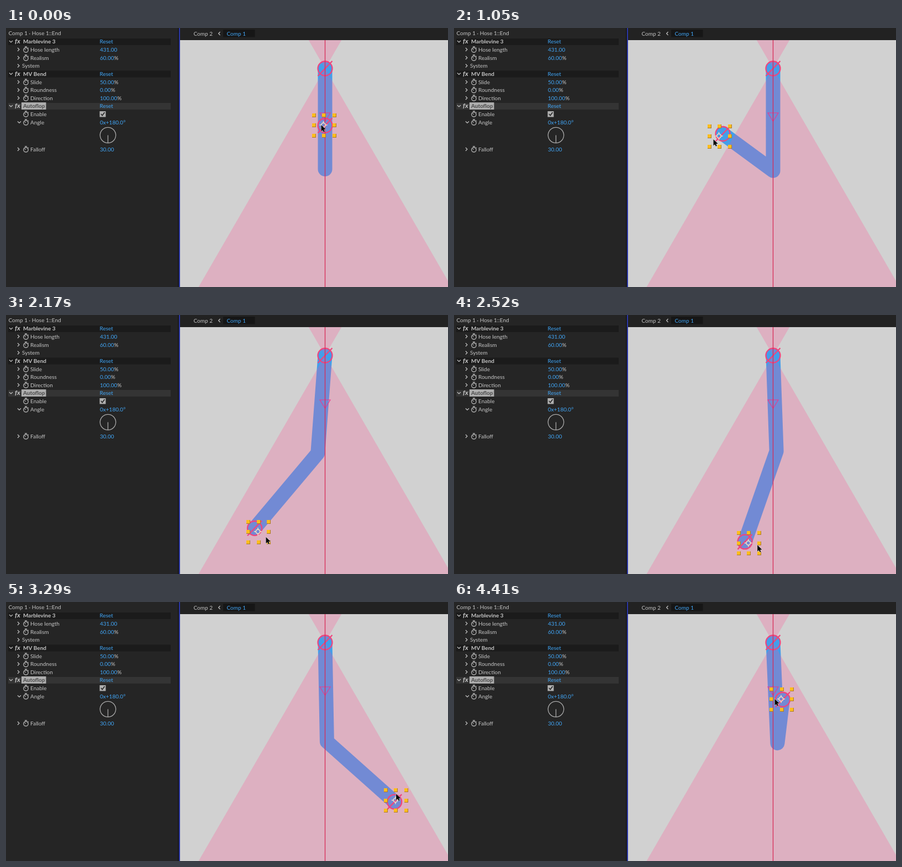
Recreate the animation shown at these times as an HTML page with a canvas. Size 800 px wide and 470 px high, loop 4.48 s.

```html
<!DOCTYPE html>
<html lang="en">
<head>
<meta charset="utf-8">
<title>Hose bend</title>
<style>
html, body { margin: 0; width: 100%; height: 100%; overflow: hidden; background: #242424; }
canvas { display: block; }
</style>
</head>
<body>
<canvas id="stage" width="800" height="470"></canvas>
<script>
const c = document.getElementById('stage').getContext('2d');
const LOOP = 4480, STEP = 70, LEAD = 100;
const LEFT = 315, TOP = 22;
const BLUE = '#41a6f7', LABEL = '#c4c4c4', PINK = '#f0457d';
const start = { x: 577.5, y: 73.5 };

// time, end x/y, joint along/across the end line, box offset x/y, cursor offset x/y
const keys = [
  [0, 577.5, 177, 131, 40, -2, -.5, -7.5, -2],
  [1050, 486.5, 192, 72.4, 113, -6, 4.5, -17.5, 9],
  [1750, 415, 302, -2, 83, 1, 8.5, 4, 26],
  [2170, 450, 387, 0, 63.5, 7, 6.5, 20, 15],
  [2800, 593, 407, 0, 57, 7.5, -.5, 24, -3],
  [3780, 708, 257, 17.5, 98, -2, -4.5, -19, -28],
  [4410, 595, 177, 129, 40, -2, -.5, -15, -2]
];

function hermite(p, q, v, w, s, span) {
  const s2 = s * s, s3 = s2 * s;
  return p * (2 * s3 - 3 * s2 + 1) + q * (3 * s2 - 2 * s3)
    + span * (v * (s3 - 2 * s2 + s) + w * (s3 - s2));
}

function poseAt(t) {
  let i = 0;
  while (i < keys.length - 2 && t >= keys[i + 1][0]) i++;
  const a = keys[i], b = keys[i + 1], span = b[0] - a[0];
  const s = Math.min(1, (t - a[0]) / span);
  const mix = k => a[k] + (b[k] - a[k]) * s;
  // the cursor leads the end, so its offset gives the velocity
  const pos = k => hermite(a[k], b[k], a[k + 6] / LEAD, b[k + 6] / LEAD, s, span);
  const end = { x: pos(1), y: pos(2) };
  const dx = end.x - start.x, dy = end.y - start.y, d = Math.hypot(dx, dy);
  const angle = Math.atan2(-dx, dy) * 180 / Math.PI;
  const flop = Math.sign(angle) * Math.sqrt(Math.min(1, Math.abs(angle) / 30));
  const along = mix(3) / d, across = mix(4) * flop / d;
  return {
    end,
    joint: {
      x: start.x + dx / 2 + dx * along + dy * across,
      y: start.y + dy / 2 + dy * along - dx * across
    },
    box: { x: end.x + mix(5), y: end.y + mix(6) },
    cursor: { x: end.x + mix(7), y: end.y + mix(8) }
  };
}

function rect(x, y, w, h, color) {
  c.fillStyle = color;
  c.fillRect(x, y, w, h);
}

function path(points, close) {
  c.beginPath();
  points.forEach(([x, y]) => c.lineTo(x, y));
  if (close) c.closePath();
}

function line(points, color, width = 1, close = false) {
  path(points, close);
  c.strokeStyle = color;
  c.lineWidth = width;
  c.stroke();
}

function circle(x, y, r, color, width) {
  c.beginPath();
  c.arc(x, y, r, 0, 7);
  c.strokeStyle = color;
  c.lineWidth = width;
  c.stroke();
}

// Returns the x where the text ends.
function text(s, x, y, color = LABEL, font = '10px') {
  c.font = font + ' Lato, sans-serif';
  c.fillStyle = color;
  c.fillText(s, x, y + 3.5);
  return x + c.measureText(s).width;
}

function ring({ x, y }) {
  circle(x, y, 13, PINK, 2.3);
  line([[x - 13, y + 13.5], [x + 13, y - 13.5]], PINK, 2.3);
}

function selection({ x, y }) {
  for (let i = -1; i < 2; i++) for (let j = -1; j < 2; j++) {
    if (!i && !j) continue;
    const px = Math.round(x + i * 18.5 - 3.5), py = Math.round(y + j * 18.5 - 3.5);
    rect(px, py, 7, 7, '#a87a2c');
    rect(px, py, 6, 6, '#ffbd1c');
  }
  const ax = x - 1, ay = y - .5;
  circle(ax, ay, 3.7, '#f6dfc2', 1.6);
  for (const [u, v] of [[1, 0], [-1, 0], [0, 1], [0, -1]])
    line([[ax + u * 4, ay + v * 4], [ax + u * 7, ay + v * 7]], '#f6dfc2', 1.5);
}

function pointer({ x, y }) {
  path([[0, 0], [0, 11.5], [2.6, 9.2], [4.5, 12.7], [6.4, 11.8], [4.7, 8.3], [8.2, 8.1]]
    .map(([u, v]) => [x + .5 + u, y + 1 + v]), true);
  c.strokeStyle = '#e8e8e8';
  c.lineWidth = 1;
  c.stroke();
  c.fillStyle = '#080808';
  c.fill();
}

function view({ end, joint, box, cursor }) {
  rect(LEFT, TOP, 800 - LEFT, 470 - TOP, '#d1d1d1');
  c.lineCap = c.lineJoin = 'round';
  line([start, joint, end].map(p => [p.x, p.y]), '#439eea', 26);
  c.lineCap = 'butt';
  c.lineJoin = 'miter';

  // two opposite cones that meet at the start
  const slope = Math.tan(Math.PI / 6);
  const edge = (y, side) => [start.x + side * (y - start.y) * slope, y];
  path([edge(TOP, 1), edge(TOP, -1), edge(470, -1), edge(470, 1)], true);
  c.fillStyle = 'rgba(255, 76, 144, .25)';
  c.fill();

  line([[568, 154], [587, 154], [577.5, 169.5]], '#f0358a', 1.1, true);
  ring(start);
  ring(end);
  line([[577.5, TOP], [577.5, 470]], '#d72c58', 1.3);
  selection(box);
  pointer(cursor);
}

function chevron(x, y, down) {
  line(down ? [[x - 3, y - 1.5], [x, y + 1.5], [x + 3, y - 1.5]]
            : [[x - 1.5, y - 3], [x + 1.5, y], [x - 1.5, y + 3]], LABEL, 1.2);
}

function stopwatch(y) {
  circle(36, y + 1, 4.2, LABEL, 1.2);
  line([[34, y - 5], [38, y - 5]], LABEL, 1.3);
  line([[33.5, y - 1], [36, y + 1]], LABEL);
  line([[39.5, y - 3.5], [41, y - 2]], LABEL);
}

function effect(name, y, selected) {
  rect(4, y - 5.5, 294, 12, selected ? '#343434' : '#1b1b1b');
  chevron(9, y, true);
  text('fx', 16, y, LABEL, 'italic bold 12px');
  if (selected) rect(28, y - 6.5, 44.5, 13, '#adadad');
  text(name, 31, y, selected ? '#4a4a4a' : LABEL, 'bold 10px');
  text('Reset', 169.5, y, BLUE);
}

function property(name, value, y, unit = '', open = false) {
  if (value) chevron(open ? 24 : 22.5, y, open);
  stopwatch(y);
  text(name, 44, y);
  text(unit, text(value, 170, y, BLUE), y);
}

function panel() {
  rect(0, 0, LEFT, 470, '#252525');
  rect(LEFT, 0, 800 - LEFT, TOP, '#222');
  rect(LEFT - 4, 0, 2, 470, '#191919');
  rect(LEFT - 2, 0, 2, 470, '#2b37a6');
  text('Comp 1 · Hose 1::End', 4.5, 9);

  effect('Marblevine 3', 24.5);
  property('Hose length', '431.00', 39);
  property('Realism', '60.00', 54, '%');
  chevron(22.5, 68.5);
  text('System', 29, 68.5);

  effect('MV Bend', 83);
  property('Slide', '50.00', 98, '%');
  property('Roundness', '0.00', 112.5, '%');
  property('Direction', '100.00', 127, '%');

  effect('Autoflop', 141.5, true);
  property('Enable', '', 156);
  rect(169.5, 151, 11, 10.5, '#b0b0b0');
  line([[172, 156], [174.3, 158.7], [178.5, 153]], '#222', 1.5);
  property('Angle', '0x+180.0°', 171, '', true);
  circle(184.5, 194.5, 14.2, '#aaa', 1.3);
  line([[184.5, 194.5], [184.5, 208.5]], '#aaa', 1.3);
  property('Falloff', '30.00', 220);

  text('Comp 2', 339.5, 10);
  line([[387.5, 7], [384.7, 10], [387.5, 13]], LABEL, 1.2);
  rect(393, 3, 57.5, 13.5, '#161616');
  text('Comp 1', 399.5, 10, BLUE);
}

function draw(now) {
  const t = Math.floor(now % LOOP / STEP) * STEP;
  view(poseAt(t));
  panel();
  requestAnimationFrame(draw);
}
draw(performance.now());
</script>
</body>
</html>
```
